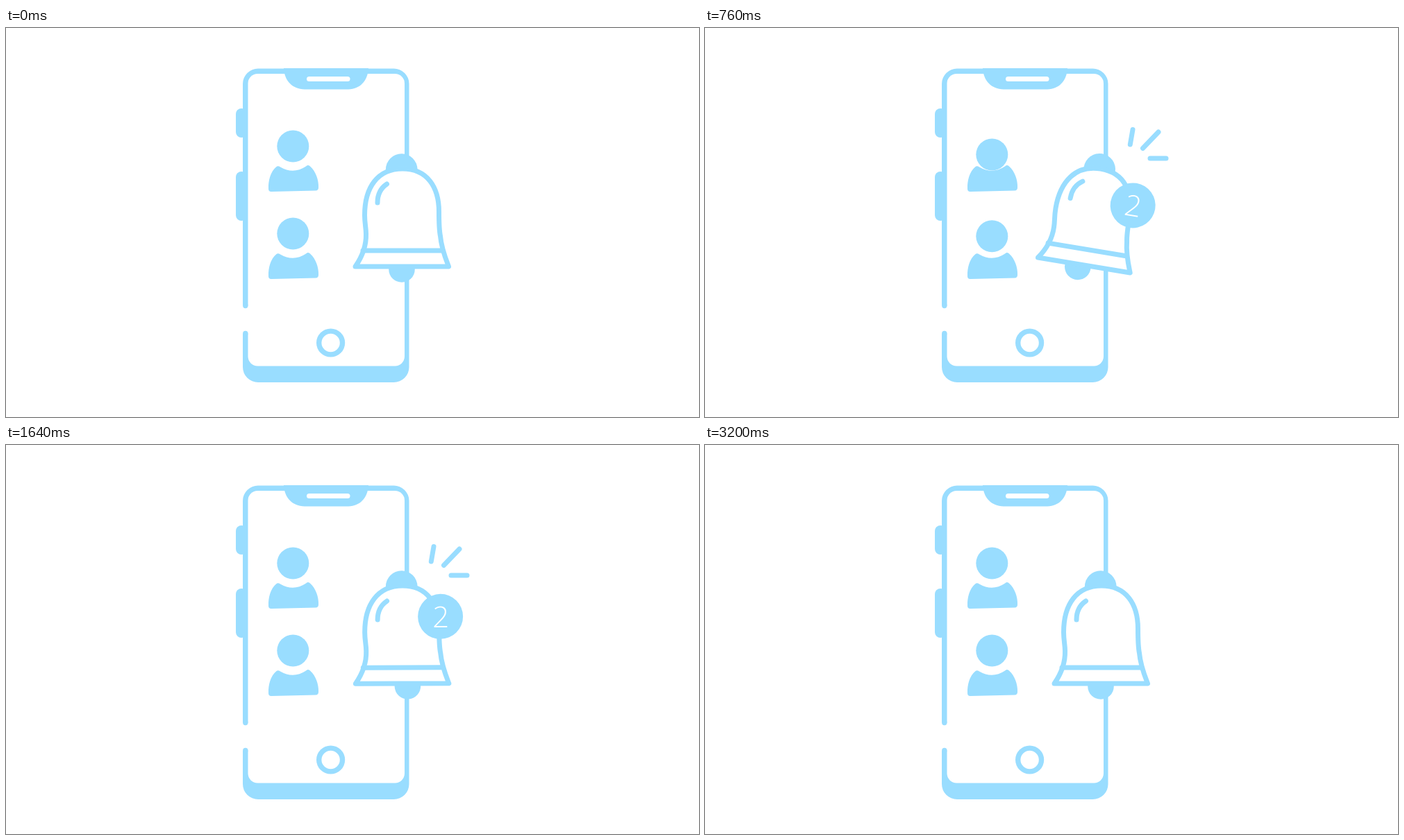
Write an HTML page with a canvas that moves like this. It is 998 by 561 pixels and loops after 3240 ms.

```html
<!DOCTYPE html>
<html lang="en">
<head>
<meta charset="utf-8">
<title>Notification bell</title>
<style>
html, body { margin: 0; width: 100%; height: 100%; overflow: hidden; background: #fff; }
canvas { display: block; width: 998px; height: 561px; }
</style>
</head>
<body>
<canvas id="stage" width="998" height="561"></canvas>
<script>
const ctx = document.getElementById('stage').getContext('2d');
const BLUE = '#99ddff', WHITE = '#ffffff';
const LOOP = 3240, STEP = 40, BEAT = 480;
const PIVOT = [570, 195];

const BODY = new Path2D(`M378 232 C377.5 220 381 207 389 200.5 Q391.5 198 395 200.5
  Q414 211.5 432 199.5 Q435.5 196.5 438.5 200 C446 207 450.5 219 450 230
  Q450 234.3 446 234.5 L382 236 Q378 236 378 232 Z`);
const NOTCH = new Path2D('M400 58 C401 76 412 88 430 88.5 L493 88.5 C510 88 521 76 522 58 Z');
const BELL = new Path2D(`M503 344 C510 334 519 317 518.5 297 C518.5 288 516.5 282 516.5 270
  C516.5 230 535 203 571 203 C607 203 623.5 230 623.5 265
  C623.5 282 623.5 290 625.5 300 C627 318 634 335 637.5 344 Z`);
const BAND = new Path2D('M514 321 H629');
const SHINE = new Path2D('M548.5 225 Q535 234 535 252');
const RAYS = new Path2D('M616 146.5 L612.3 168 M653 150 L630.5 173.5 M641 188 H664');

const clamp = v => Math.max(0, Math.min(1, v));
const ease = (t, a, b) => {
  const k = clamp((t - a) / (b - a));
  return k * k * (3 - 2 * k);
};
const wave = (t, peak) => Math.cos(2 * Math.PI * (t - peak) / BEAT);
const bump = (t, mid, w) => Math.exp(-(((t - mid) / w) ** 2));
const rad = deg => deg * Math.PI / 180;

function swing(t) {
  if (t < 98) return -13 * ease(t, 0, 98);
  return 13 * wave(t, 338) * (t > 860 ? bump(t, 860, 440) : 1);
}

function clapperSwing(t) {
  const fade = ease(t, 0, 120) * (1 - ease(t, 1400, 2000));
  return fade * (1.5 + 8.2 * wave(t, 385));
}

function headDrop(t, mid, amp, peak) {
  const fade = ease(t, 0, 240) * (1 - ease(t, 1040, 1330));
  return fade * (mid + amp * wave(t, peak)) - 1.6 * bump(t, 1390, 120);
}

function badgeScale(t) {
  const pop = 1.27 * ease(t, 220, 390) - 0.27 * ease(t, 400, 530);
  return pop * (1 - ease(t, 3000, 3200));
}

const rayAlpha = t => ease(t, 160, 320) - ease(t, 820, 960)
  + ease(t, 1270, 1460) - ease(t, 1800, 1960);

function fill(path, color = BLUE) {
  ctx.fillStyle = color;
  ctx.fill(path);
}

function stroke(path) {
  ctx.strokeStyle = BLUE;
  ctx.lineWidth = 7;
  ctx.lineCap = ctx.lineJoin = 'round';
  ctx.stroke(path);
}

function box(x, y, w, h, r, color) {
  const p = new Path2D();
  p.roundRect(x, y, w, h, r);
  fill(p, color);
}

function disc(x, y, r, color) {
  const p = new Path2D();
  p.arc(x, y, r, 0, 2 * Math.PI);
  fill(p, color);
}

function turn(deg) {
  ctx.translate(...PIVOT);
  ctx.rotate(rad(deg));
  ctx.translate(-PIVOT[0], -PIVOT[1]);
}

function drawPhone() {
  box(331, 116, 16, 42, 8);
  box(331, 207, 16, 71, 8);
  box(341, 58.5, 239.5, 452.5, 22);
  box(348.5, 66, 225.5, 421.5, 14, WHITE);
  ctx.fillStyle = WHITE;
  ctx.fillRect(339, 400.5, 11, 40);
  disc(344.8, 400.5, 3.7);
  disc(344.8, 440.5, 3.7);
  fill(NOTCH);
  box(433, 70, 62.5, 7, 3.5, WHITE);
  disc(467.6, 454, 20.6);
  disc(467.6, 454, 13.2, WHITE);
}

function drawPerson(dy, drop) {
  ctx.save();
  ctx.translate(0, dy);
  fill(BODY);
  disc(413.3, 170.5 + drop, 23);
  ctx.restore();
}

function drawBadge(scale) {
  if (scale <= 0) return;
  ctx.save();
  ctx.translate(625.5, 247.5);
  ctx.scale(scale, scale);
  disc(0, 0, 32.5);
  ctx.fillStyle = WHITE;
  ctx.font = '300 42px "Open Sans", "Noto Sans", sans-serif';
  ctx.textAlign = 'center';
  ctx.fillText('2', 0.5, 15.5);
  ctx.restore();
}

function drawBell(t) {
  ctx.save();
  turn(swing(t));
  ctx.save();
  turn(clapperSwing(t));
  disc(570, 348, 18.8);
  ctx.restore();
  disc(569.7, 204, 22.8);
  fill(BELL, WHITE);
  [BELL, BAND, SHINE].forEach(stroke);
  drawBadge(badgeScale(t));
  ctx.restore();
}

function draw(t) {
  ctx.fillStyle = WHITE;
  ctx.fillRect(0, 0, 998, 561);
  drawPhone();
  drawPerson(0, headDrop(t, 9.2, 2.8, 280));
  drawPerson(126, headDrop(t, 9, 8, -26));
  ctx.globalAlpha = clamp(rayAlpha(t));
  stroke(RAYS);
  ctx.globalAlpha = 1;
  drawBell(t);
}

let start;
function tick(now) {
  start ??= now;
  draw(Math.floor(((now - start) % LOOP) / STEP) * STEP);
  requestAnimationFrame(tick);
}
draw(0);
requestAnimationFrame(tick);
</script>
</body>
</html>
```
